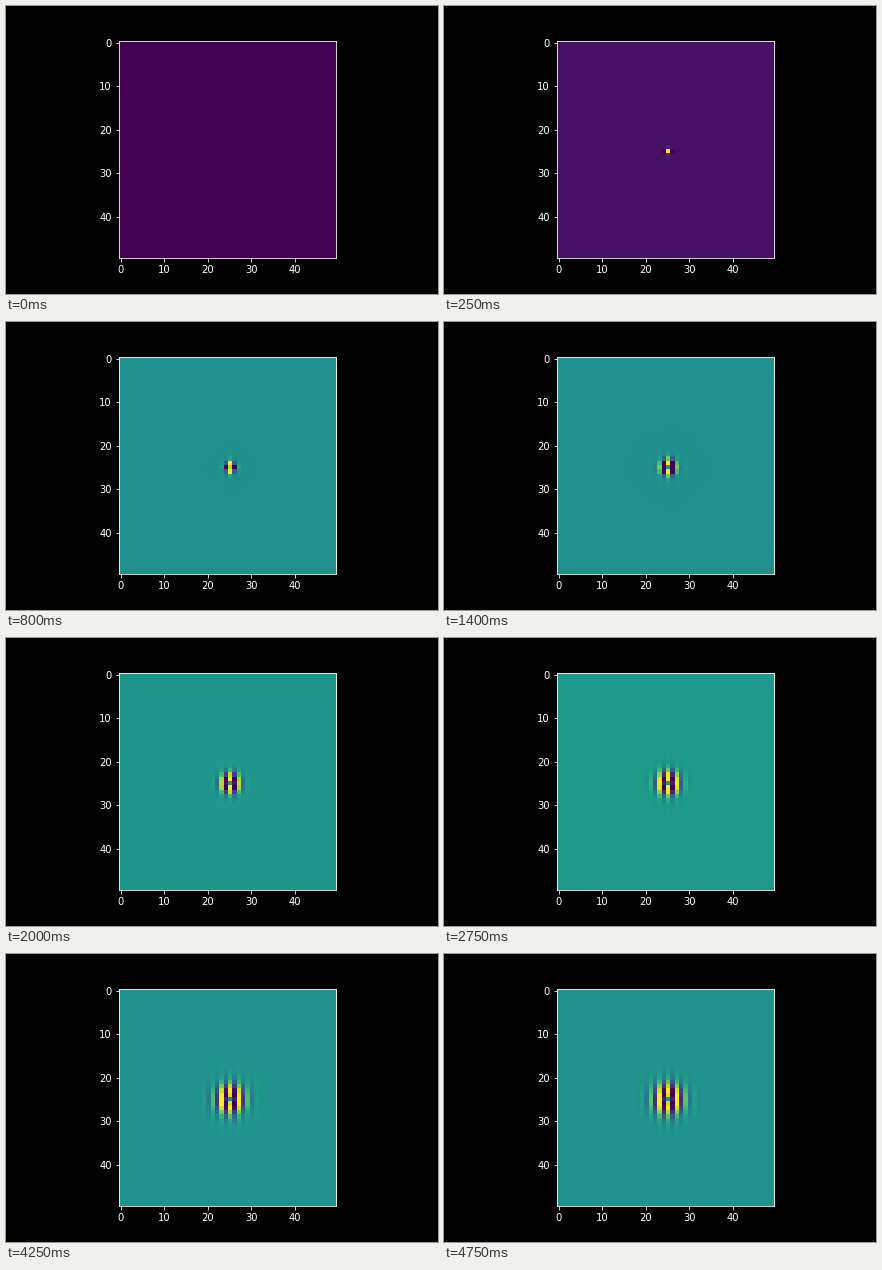
Recreate the animation shown at these times as a matplotlib script. Size 432 by 288 pixels, loop 5000 ms.

```python
import numpy as np
import matplotlib.pyplot as plt
from matplotlib.animation import FuncAnimation

SIZE, FRAMES, INTERVAL = 50, 100, 50
MID = SIZE // 2
COUPLING = 0.025
OMEGA = 0.1


def second_difference(field, axis):
    return np.roll(field, 1, axis) + np.roll(field, -1, axis) - 2 * field


def simulate():
    """Driven field that spreads along y and is unstable along x."""
    field = np.zeros((SIZE, SIZE))
    rate = np.zeros_like(field)
    history = []
    for step in range(FRAMES):
        force = second_difference(field, 0) - second_difference(field, 1)
        field, rate = field + rate, rate + COUPLING * force
        field[MID, MID] = np.sin(OMEGA * step)
        history.append(field.copy())
    return history


plt.style.use("dark_background")
plt.rcParams.update({"font.family": "DejaVu Sans", "font.size": 10})

history = simulate()
fig, ax = plt.subplots(figsize=(6, 4), dpi=72)
fig.subplots_adjust(left=0.125, right=0.9, bottom=0.125, top=0.88)
image = ax.imshow(history[0], cmap="viridis", interpolation="nearest")
ax.set_xticks(range(0, SIZE, 10))
ax.set_yticks(range(0, SIZE, 10))


def update(frame):
    field = history[frame]
    image.set_data(field)
    image.set_clim(field.min(), field.max())
    return (image,)


anim = FuncAnimation(fig, update, frames=FRAMES, interval=INTERVAL,
                     repeat=True, repeat_delay=0)
plt.show()
```
